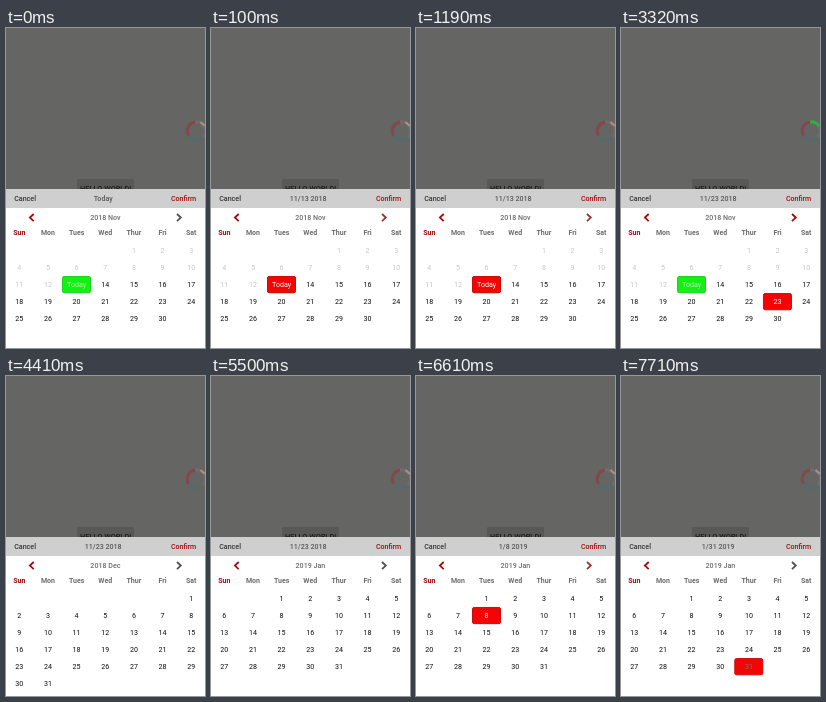
Write an HTML page that moves like this. It is 199 by 320 pixels and loops after 8000 ms.

```html
<!DOCTYPE html>
<html lang="en">
<head>
<meta charset="utf-8">
<title>Date picker</title>
<style>
  html, body { margin: 0; width: 100%; height: 100%; overflow: hidden; background: #fff; }
  svg { display: block; width: 100vw; height: 100vh; }
  text { font: 400 7.1px Roboto, Arial, sans-serif; text-anchor: middle; }
  .medium { font-weight: 500; }
  .bold { font-weight: 700; font-size: 7px; }
</style>
</head>
<body>
<svg id="stage" viewBox="0 0 199 320"></svg>
<script>
const stage = document.getElementById("stage");
const LOOP = 8000, COL = 28.65, ROW = 17.05;
const RED = "#a40a0a", GREY = "#505050", WINE = "#963434", RING = "#756a6a";

function add(tag, attrs, label = "") {
  const node = document.createElementNS("http://www.w3.org/2000/svg", tag);
  for (const key in attrs) node.setAttribute(key, attrs[key]);
  node.textContent = label;
  return stage.appendChild(node);
}
const box = (x, y, width, height, fill, rx = 0) => add("rect", { x, y, width, height, fill, rx });
const text = (x, y, fill, label = "", weight = "") =>
  add("text", { x, y, fill, class: weight }, label);
const line = (d, stroke, width) => add("path", { d, stroke, "stroke-width": width, fill: "none" });
const centerX = col => 13.3 + col * COL;

// Arc of the dimmed progress ring, angles in degrees clockwise from the right
function arc(from, to, color) {
  const point = deg => {
    const a = deg * Math.PI / 180;
    return `${190.3 + 9 * Math.cos(a)} ${103 + 9 * Math.sin(a)}`;
  };
  return line(`M${point(from)}A9 9 0 0 1 ${point(to)}`, color, 3.2);
}

// Dimmed page
box(0, 0, 199, 162, "#656663");
arc(-30, 45, "#6f6b69");
arc(45, 150, "#546b6e");
arc(150, 262, "#83484d");
const ringTop = arc(-98, -30, RING);
const ringTip = line("M194.5 94L199 98", "#a88f8b", 2.2);
box(71, 151, 57, 12, "#585957", 1);
text(99.6, 163.2, "#1c1c1c", "HELLO WORLD!", "medium").style.fontSize = "7.4px";

// Sheet
box(0, 161, 199, 19, "#cfcfcf");
box(0, 180, 199, 140, "#fff");
text(19.1, 173.3, "#343434", "Cancel", "medium");
text(177.6, 173.3, RED, "Confirm", "medium");
const title = text(97.2, 173.3, "#585858", "", "medium");
const month = text(99.4, 192.2, "#6c6c6c", "", "medium");
line("M27.7 186L23.9 189.6L27.7 193.2", RED, 1.8);
const next = line("M171 186L174.8 189.6L171 193.2", GREY, 1.8);
["Sun", "Mon", "Tues", "Wed", "Thur", "Fri", "Sat"].forEach((name, col) =>
  text(centerX(col), 207, col ? "#6c6c6c" : RED, name, "bold"));

const todayMark = box(0, 0, 28, 16.2, "#14f014", 1.6);
const pickMark = box(0, 0, 28, 16.2, "#f40505", 1.6);
todayMark.setAttribute("stroke", "#1fd41f");
pickMark.setAttribute("stroke", "#cc0c0c");
const days = Array.from({ length: 31 }, () => text(0, 0, "#111"));

const months = {
  nov: { label: "2018 Nov", start: 4, count: 30, today: 13 },
  dec: { label: "2018 Dec", start: 6, count: 31, today: 0 },
  jan: { label: "2019 Jan", start: 2, count: 31, today: 0 }
};
const states = [
  { at: 0, page: "nov", title: "Today", pick: 0 },
  { at: 100, page: "nov", title: "11/13 2018", pick: 13, arrow: WINE },
  { at: 3320, page: "nov", title: "11/23 2018", pick: 23, arrow: RED, ring: "#38a848" },
  { at: 4410, page: "dec", title: "11/23 2018", pick: 0 },
  { at: 5500, page: "jan", title: "11/23 2018", pick: 0 },
  { at: 6610, page: "jan", title: "1/8 2019", pick: 8, arrow: WINE },
  { at: 7710, page: "jan", title: "1/31 2019", pick: 31, ink: "#687870" }
];

function place(mark, day, start) {
  mark.setAttribute("visibility", day ? "visible" : "hidden");
  const slot = start + day - 1;
  mark.setAttribute("x", centerX(slot % 7) - 14.1);
  mark.setAttribute("y", 214.4 + Math.floor(slot / 7) * ROW);
}

function show(state) {
  const { label, start, count, today } = months[state.page];
  title.textContent = state.title;
  month.textContent = label;
  next.setAttribute("stroke", state.arrow || GREY);
  ringTop.setAttribute("stroke", state.ring || RING);
  ringTip.setAttribute("visibility", state.ring ? "hidden" : "visible");
  place(todayMark, today, start);
  place(pickMark, state.pick, start);

  days.forEach((node, i) => {
    const day = i + 1, slot = start + i;
    let fill = day < today ? "#c6c6c6" : "#0c0c0c";
    if (day === today) fill = "#b5efb0";
    if (day === state.pick) fill = state.ink || "#fff";
    node.setAttribute("x", centerX(slot % 7));
    node.setAttribute("y", 225 + Math.floor(slot / 7) * ROW);
    node.setAttribute("fill", fill);
    node.textContent = day > count ? "" : day === today ? "Today" : day;
  });
}

const origin = performance.now();
let current;
function tick() {
  const t = (performance.now() - origin) % LOOP;
  const state = states.filter(s => s.at <= t).pop();
  if (state !== current) show(current = state);
  requestAnimationFrame(tick);
}
tick();
</script>
</body>
</html>
```
